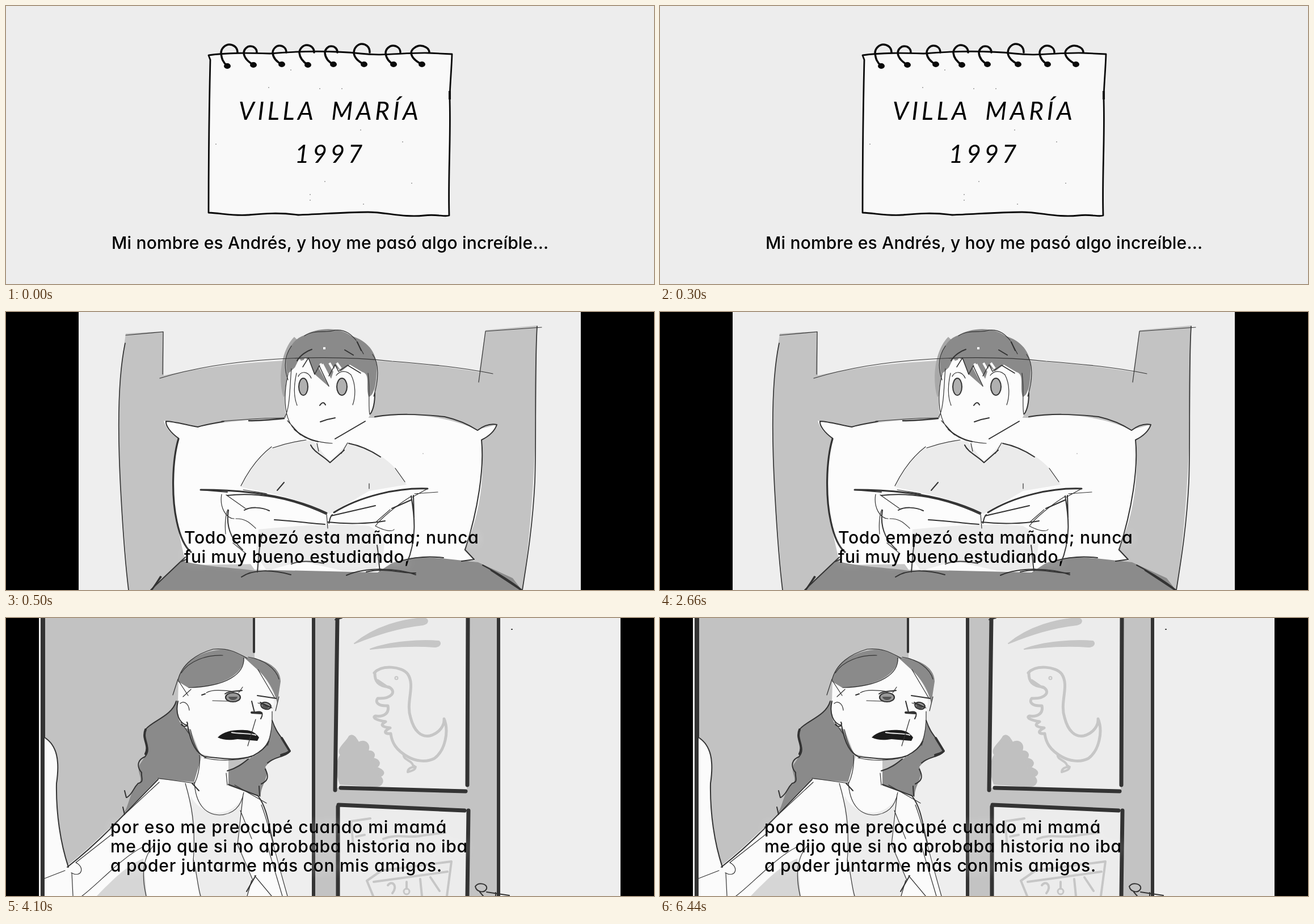
Animation of 1142 by 491 pixels, one loop 8 s. Source, as an HTML page:

```html
<!DOCTYPE html>
<html lang="es">
<head>
<meta charset="utf-8">
<title>Storyboard</title>
<style>
html, body { margin: 0; width: 100%; height: 100%; overflow: hidden; background: #000; }
svg { display: block; width: 1142px; height: 491px; }
.scene { visibility: hidden; animation: 8s step-end infinite; }
#note { animation-name: note; }
#bed { animation-name: bed; }
#door { animation-name: door; }
@keyframes note { 0% { visibility: visible } 6.25%, 100% { visibility: hidden } }
@keyframes bed { 0% { visibility: hidden } 6.25% { visibility: visible } 51.25%, 100% { visibility: hidden } }
@keyframes door { 0% { visibility: hidden } 51.25%, 100% { visibility: visible } }
.ink { fill: none; stroke: #333; stroke-linecap: round; stroke-linejoin: round; }
.thin { stroke-width: 1.2; }
.mid { stroke-width: 2; }
.bold { stroke-width: 4; }
.bar { stroke-width: 7; }
.sub { font: 500 30px Inter, "Open Sans", sans-serif; font-feature-settings: "cv11"; }
.glow { filter: drop-shadow(0 0 9px rgba(255, 255, 255, .55)); }
.hand { font: italic 44px Lato, "Open Sans", sans-serif; letter-spacing: 5.7px; word-spacing: 11px; }
</style>
</head>
<body>
<svg viewBox="0 0 1142 491">

<g id="note" class="scene">
  <rect width="1142" height="491" fill="#ededed"/>
  <path fill="#f9f9f9" stroke="#0a0a0a" stroke-width="2.8" stroke-linejoin="round" d="M357 87C390 82 430 83 465 84C520 79 580 79 625 84C665 89 700 82 745 83L786 85C785 115 782 145 782 165C784 235 779 300 781 370C772 373 760 367 737 370C700 374 670 364 638 364C595 364 550 368 515 369C480 364 450 367 427 369C400 371 380 366 357 365C357 270 358 180 360 95Z"/>
  <path d="M782 150V165" stroke="#0a0a0a" stroke-width="4"/>
  <g id="rings" class="ink" style="stroke:#0a0a0a" stroke-width="3.5"></g>
  <path stroke="#999" stroke-width="2" stroke-linecap="round" d="M463 144h0M553 146h0M592 146h0M502 113h0M370 244h0M562 310h0M536 333h0M536 343h0M715 313h0M625 219h0M699 240h0M630 350h0"/>
  <text class="hand" x="410" y="201">VILLA MARÍA</text>
  <text class="hand" x="509" y="277">1997</text>
  <text class="sub" x="186" y="429" letter-spacing=".18">Mi nombre es Andrés, y hoy me pasó algo increíble...</text>
</g>

<g id="bed" class="scene">
  <rect width="1142" height="491"/>
  <rect x="128" width="885" height="491" fill="#eee"/>
  <!-- headboard -->
  <path fill="#c3c3c3" d="M211 38L278 34V112C370 92 480 84 570 84C680 84 780 97 834 106L845 32L935 24C938 200 927 380 910 491H216C206 350 187 200 211 38Z"/>
  <!-- pillow -->
  <path fill="#fcfcfc" d="M278 192C300 196 322 197 338 203C390 192 440 190 492 187H650C700 177 770 181 830 208L865 199C860 212 848 222 838 227C845 300 832 370 807 420L826 439L318 447C298 370 284 290 304 223C290 215 282 205 278 192Z"/>
  <!-- blanket -->
  <path fill="#8b8b8b" d="M256 491L310 439C345 450 400 451 440 457C470 460 490 446 516 440C560 438 590 458 632 458C660 455 690 436 725 433C770 433 805 440 832 442L893 470L909 491Z"/>
  <!-- shirt, book and hands -->
  <path fill="#ebebeb" d="M414 309C432 275 455 244 470 240L522 227L603 232C650 240 690 270 706 305L640 316L570 357C510 325 450 318 414 309Z"/>
  <path fill="#fcfcfc" d="M342 314C430 315 510 325 570 357C610 330 670 308 742 312L718 322L722 385L700 430L655 460L438 455L392 390L384 325Z"/>
  <path fill="#ebebeb" d="M445 384C510 377 590 373 640 378L668 395L664 440L646 458L594 457L520 440L460 457L440 430Z"/>
  <path fill="#fcfcfc" d="M540 226L603 230L571 265Z"/>
  <!-- head -->
  <path fill="#a8a8a8" d="M508 44C482 70 480 125 489 150L497 145L500 100L525 60Z"/>
  <path fill="#fcfcfc" d="M498 92C490 145 487 190 503 206C525 230 570 241 600 222C635 205 647 180 650 145L640 80L540 60Z"/>
  <path fill="#8a8a8a" d="M496 110C489 75 503 48 526 41C550 26 590 27 608 42C638 51 656 73 653 105C652 130 648 148 639 150C633 130 643 110 628 106L606 93L590 105L580 95L573 118L559 91L551 98L569 132L543 109L533 82L514 88L509 98Z"/>
  <path fill="none" stroke="#fcfcfc" stroke-width="4" d="M518 84L508 108M527 82L536 108M554 91L565 113M570 90L578 104M583 90L590 100M559 64h4"/>
  <g fill="#b0b0b0" stroke="#333" stroke-width="2">
    <ellipse cx="524" cy="132" rx="8" ry="15"/>
    <ellipse cx="592" cy="132" rx="9" ry="15"/>
  </g>
  <g class="ink thin">
    <path d="M211 41L277 35L276 110M271 117C390 80 560 74 680 87C760 93 820 101 858 109M833 124L845 34L944 27"/>
    <path d="M503 100C500 130 501 170 491 186M497 109C488 150 490 190 510 209C530 224 545 230 575 232M496 192L519 217M638 108C642 135 638 165 641 181M512 108C507 130 507 150 513 165M515 114C520 103 533 105 538 117M582 112C588 104 599 102 608 111C617 128 616 150 611 164"/>
    <path d="M526 42C545 30 565 38 580 32C600 30 610 42 617 50M503 60C489 80 490 100 497 120M618 52L630 74M646 75C658 90 657 120 648 149"/>
    <path d="M414 307C430 275 448 253 468 238M470 240C490 233 507 229 529 226M591 250L602 231M686 276L703 300M548 232L551 246"/>
    <path d="M380 322C376 345 388 365 402 365M388 323L422 347M405 365C425 365 432 375 440 382M715 325C690 340 660 365 651 378C666 386 680 389 684 384M400 408L422 426M640 303V312M387 392C385 370 388 355 391 349M380 193C440 188 465 187 490 187M653 370L677 349M565 357L567 382"/>
    <path d="M735 250h0"/>
    <path d="M210 55C194 130 198 245 203 330C207 400 211 450 216 491M936 25C931 110 935 220 932 300C928 380 918 440 910 491" stroke-width="1.7"/>
  </g>
  <g class="ink mid">
    <path d="M338 203C316 199 295 193 282 193C281 201 290 213 304 223M338 203C355 198 372 196 384 193M650 185C690 179 725 180 773 185C795 190 814 198 831 209C843 200 855 197 865 199C861 211 850 220 838 226C843 275 832 350 809 420L825 437L803 440"/>
    <path d="M553 165Q559 156 563 164M554 194Q567 189 580 187M513 86C519 76 530 69 539 66M597 67L612 76M619 53L626 68M580 224L633 193M508 207C520 219 535 226 550 229M650 143C650 160 648 172 642 180"/>
    <path d="M523 97L533 81L544 110L552 95L569 131M569 113L580 93L586 105L602 94L625 108" stroke-width="1.5"/>
    <path d="M537 235C543 248 558 253 571 266L596 244M604 232C630 237 648 248 660 256M478 315L490 301"/>
    <path d="M343 314L390 318M390 324C440 318 500 327 564 357M392 350C387 380 397 402 417 420M714 325C720 360 725 400 706 445M718 324L719 363M573 360L651 342M567 371C600 375 640 374 668 369M473 367C510 369 540 374 562 375M575 358C570 363 571 368 569 373M420 350C430 344 450 344 464 351M680 347L714 332M452 391C445 415 445 440 443 459M654 412C657 430 657 446 659 457M635 459C670 451 700 462 722 461"/>
    <path d="M316 433L255 491M272 467L257 491M415 468C435 454 470 455 502 464M600 465C635 450 690 452 722 464M503 445C520 438 545 441 560 444M698 439C720 433 747 431 771 434M840 447C870 463 890 475 909 491M318 437L308 441"/>
  </g>
  <g class="ink bold">
    <path d="M304 224C292 265 292 330 301 370C307 398 315 415 326 424" stroke-width="3.2"/>
    <path d="M343 314C430 314 505 326 565 355M578 354C625 325 690 310 743 312M258 489L273 468M855 456L908 491" stroke-width="3"/>
    <path d="M428 192C450 192 470 190 490 188" stroke-width="2.5"/>
  </g>
  <path class="ink thin" d="M418 314C435 317 450 319 460 321M743 312L716 327M720 321L761 318"/>
  <g class="sub glow">
    <text x="314" y="409" letter-spacing=".7">Todo empezó esta mañana; nunca</text>
    <text x="314" y="443" letter-spacing=".56">fui muy bueno estudiando,</text>
  </g>
</g>

<g id="door" class="scene">
  <rect width="1142" height="491"/>
  <rect x="58" width="1025" height="491" fill="#eee"/>
  <path fill="#c2c2c2" d="M68 0H438V491H68Z"/>
  <path fill="#eee" d="M430 300H541V491H430Z"/>
  <path fill="#333" d="M61 0H69V491H61Z"/>
  <!-- door -->
  <path fill="#c3c3c3" d="M541 0H869V491H541Z"/>
  <path fill="#ececec" d="M584 0H814L812 306L580 300ZM585 330L815 340L813 491H585Z"/>
  <!-- glass drawings -->
  <g fill="none" stroke="#c6c6c6" stroke-width="5" stroke-linecap="round" stroke-linejoin="round">
    <path fill="#c6c6c6" stroke-width="2" d="M614 45C650 15 700 2 737 0C746 3 744 10 735 12C690 17 655 29 614 45ZM642 55C675 42 730 38 763 41C768 46 763 51 755 51C715 48 680 51 642 55Z"/>
    <path d="M649 97C662 82 697 85 708 99C722 120 704 148 713 176C719 199 731 211 747 208C764 203 773 190 772 178C781 200 774 234 755 248C740 256 720 252 708 245C687 233 680 220 678 204C666 205 665 200 677 194C660 192 660 188 669 183C655 181 644 176 651 173C665 175 676 169 673 155C655 156 650 148 655 142C680 143 689 130 675 122C655 120 650 111 650 98"/>
    <path d="M701 240C698 251 716 251 717 260C724 263 724 268 708 272C708 266 714 263 722 263M655 110L674 123" stroke-width="4"/>
    <path fill="#c0c0c0" stroke="#c0c0c0" d="M590 292C582 272 585 248 592 242C582 232 600 222 606 210C613 205 618 218 621 222C632 214 643 225 635 237C650 234 650 245 643 249C660 250 659 260 650 264C668 270 667 277 656 279C667 287 662 296 650 296Z"/>
    <path d="M612 402L608 359L642 354M617 386L632 383M665 390C690 380 710 390 735 384L774 379M636 464L662 446L785 430L777 491M636 464L647 491M648 466L778 448M673 472C681 462 691 474 681 486M706 466V478M730 461L733 491M748 458L764 482" stroke-width="4"/>
    <circle cx="688" cy="106" r="1"/>
    <circle cx="706" cy="483" r="5" stroke-width="3"/>
  </g>
  <g class="ink bar">
    <path d="M542 0V491M868 0V491" stroke-width="6"/>
    <path d="M584 0L580 304M814 0L813 295M590 300L810 306M586 330L808 340M585 333V491M815 340L813 491"/>
  </g>
  <path class="ink mid" d="M580 3L592 0M827 474C833 466 849 469 847 478C843 487 829 484 827 474M835 484L841 491M847 484L887 490M863 485V491M891 20h1"/>
  <path class="ink bold" d="M437 0V60"/>
  <!-- hair behind -->
  <path fill="#8a8a8a" d="M300 145C292 176 247 184 243 207C246 225 255 233 236 258C229 274 242 280 235 292C216 310 219 326 207 346L268 285L345 290L341 242L320 190Z"/>
  <path fill="#8a8a8a" d="M466 178C475 200 490 220 500 233C495 244 470 245 457 263C466 282 447 297 449 316L392 299V270L430 248C450 232 462 215 466 178Z"/>
  <!-- body and arm -->
  <path fill="#fbfbfb" d="M68 211C86 222 96 248 89 290C88 340 98 400 108 437C145 410 210 345 267 284L331 291L345 244H392V296L444 314C462 337 470 390 496 491H68Z"/>
  <path fill="#d6d6d6" d="M160 491C185 465 215 435 242 425L248 491Z"/>
  <path fill="#ececec" d="M325 313C342 350 395 357 417 316L410 400L433 455L426 491H340L329 390Z"/>
  <!-- face -->
  <path fill="#fbfbfb" d="M304 110L322 123C370 115 410 100 419 70L446 90C468 120 477 145 469 165C471 205 460 236 430 247C400 252 370 247 342 240L325 196C305 196 299 170 303 148Z"/>
  <path fill="#8a8a8a" d="M303 112C309 78 340 60 378 56C392 55 408 61 420 70C419 98 385 121 321 123ZM420 70C450 70 484 84 484 112L478 151C474 130 460 107 446 94Z"/>
  <g fill="#999" stroke="#333" stroke-width="2.2">
    <ellipse cx="400" cy="140" rx="13" ry="8"/>
    <ellipse cx="458" cy="155" rx="9" ry="6" transform="rotate(15 458 155)"/>
  </g>
  <path fill="#555" d="M392 139a8 6 0 0 0 16 0ZM452 154a6 5 0 0 0 12 2Z"/>
  <path fill="#1c1c1c" d="M373 211C384 200 401 197 421 198C434 198 442 205 446 211L443 217L408 214C394 216 384 216 373 211Z"/>
  <path fill="none" stroke="#ddd" stroke-width="2" d="M397 202C412 205 430 203 441 207"/>
  <g class="ink thin">
    <path d="M303 110C310 80 337 63 365 55C395 52 411 64 425 71M309 97C322 76 353 65 382 66M419 70C421 99 388 121 322 123M427 69C455 73 476 90 481 108M444 91L474 142M303 108L294 136M304 111L321 137M326 126L312 139"/>
    <path d="M353 132C365 125 385 128 402 130M364 146L393 147M417 122L410 132M481 139L475 164M444 150L469 159M440 179L426 226M469 165C470 190 466 210 461 225"/>
    <path d="M325 197C330 222 337 239 349 244M349 247C380 254 410 251 433 245M307 151C313 145 322 151 323 163M308 184L323 205"/>
    <path d="M341 242C343 264 337 283 332 293M388 274L390 295M184 370L270 290M268 283L332 292M316 292C326 326 335 365 330 430M332 290C334 327 350 347 376 348C402 347 415 331 419 308M403 295L459 327M418 311L408 400L435 463M413 340L433 390M123 432L189 380M115 450C133 460 140 440 123 432M116 450L118 491M134 491C162 470 204 423 240 405M262 400C242 420 238 452 247 491M330 425C337 455 338 475 343 491M487 491L460 400M68 460L104 446M450 330C462 360 470 400 496 491M433 463L425 491M438 455L468 491"/>
  </g>
  <g class="ink mid">
    <path d="M68 211C90 225 95 252 89 292C88 345 96 398 110 440M108 440C140 415 164 392 184 372L268 285"/>
    <path d="M303 147C298 169 305 186 320 190M309 188C316 195 322 190 319 184M320 190C326 223 336 240 352 246M350 245C386 249 412 252 436 243C449 236 458 228 463 218M390 270C408 265 417 257 427 249M328 292L340 305M392 294L444 314M444 314C462 338 463 370 472 400"/>
    <path d="M386 134C394 128 407 130 416 128M345 136L351 134M443 137L476 142M448 149L467 158M433 147L438 167M438 167C448 164 456 165 449 178"/>
    <path d="M300 147C292 174 258 181 246 197C237 219 259 227 245 245C230 251 231 264 239 273C238 283 244 289 233 292C223 302 224 310 213 317M209 305L212 317M206 334L209 347M469 181C475 198 480 204 488 215L500 235C494 246 474 244 461 256M457 267C464 281 461 288 450 293M446 297L447 314M440 455L424 483"/>
  </g>
  <path class="ink bold" d="M246 197C239 214 254 224 246 240M486 212L500 235C496 240 489 240 485 242M433 167L450 168" stroke-width="3"/>
  <g class="sub glow">
    <text x="184" y="380" letter-spacing=".9">por eso me preocupé cuando mi mamá</text>
    <text x="184" y="414" letter-spacing=".63">me dijo que si no aprobaba historia no iba</text>
    <text x="184" y="448" letter-spacing=".71">a poder juntarme más con mis amigos.</text>
  </g>
</g>
</svg>
<script>
// left, right, top, knob x, knob y
const rings = [
  [379, 408, 68, 390, 106], [419, 442, 71, 436, 104], [470, 494, 70, 486, 103], [517, 543, 69, 532, 104],
  [562, 584, 71, 577, 103], [613, 641, 67, 631, 103], [669, 695, 70, 683, 103], [714, 746, 70, 733, 103]
];
document.getElementById("rings").innerHTML = rings.map(([l, r, t, x, y]) => {
  const m = (l + r) / 2;
  return `<path d="M${r} 82C${r} ${t + 4} ${m + 6} ${t} ${m} ${t}S${l} ${t + 6} ${l} 83C${l + 1} 93 ${x - 8} 99 ${x} ${y}"/>
    <ellipse cx="${x}" cy="${y}" rx="5" ry="4" fill="#0a0a0a" stroke-width="2"/>`;
}).join("");
</script>
</body>
</html>
```
